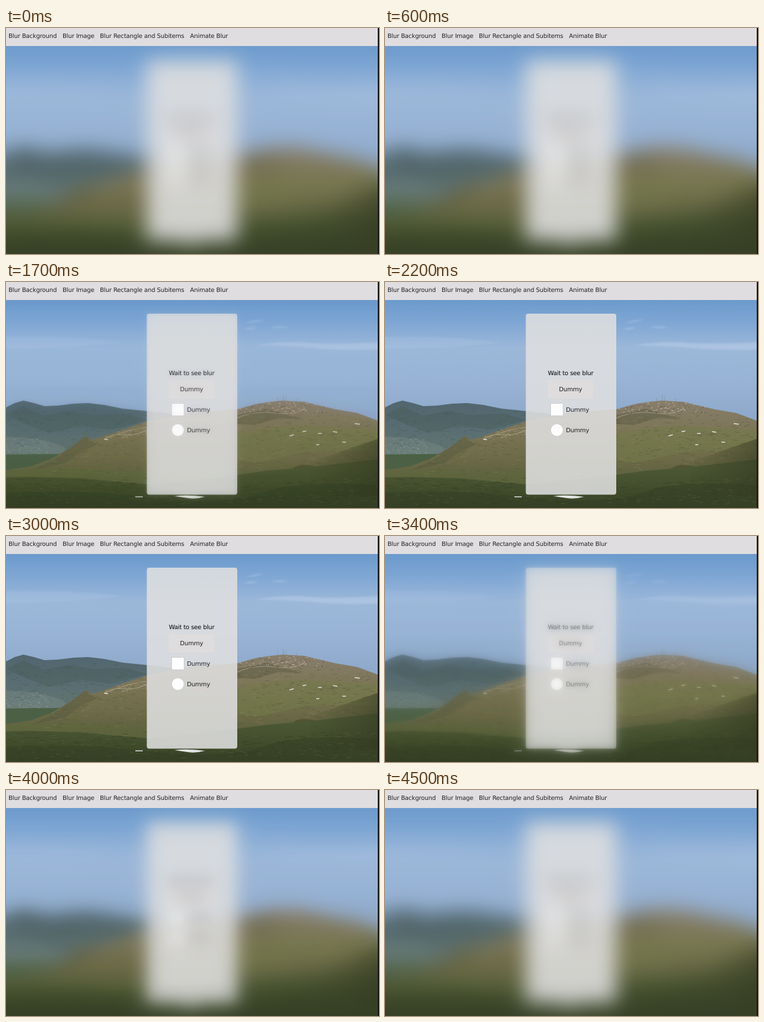
An HTML page that plays this animation: 600 by 364 pixels, repeating every 4600 ms.

```html
<!DOCTYPE html>
<html lang="en">
<head>
<meta charset="utf-8">
<title>Blur demo</title>
<style>
  html, body { margin: 0; width: 100%; height: 100%; overflow: hidden; }
  #stage { position: relative; width: 600px; height: 364px; overflow: hidden; background: #6d9bcc; }
  text, #bar {
    font: 9.7px "DejaVu Sans", sans-serif;
    letter-spacing: -.18px;
    text-rendering: geometricPrecision;
  }
  .defs { position: absolute; width: 0; height: 0; }
  .clouds { filter: blur(1.5px); }
  /* layers overhang the stage so that blurred edges never fade */
  .layer { position: absolute; left: -60px; top: -60px; width: 720px; height: 484px; }
  .soft { filter: blur(2.5px); animation: soft 4.6s linear infinite; will-change: opacity; }
  .mid  { filter: blur(7px);   animation: mid 4.6s linear infinite;  will-change: opacity; }
  .deep { filter: blur(16px);  animation: deep 4.6s linear infinite; will-change: opacity; }
  @keyframes soft {
    0%, 28.2% { opacity: 1; }
    28.26% { opacity: .5; }
    30.43% { opacity: .35; }
    34.8% { opacity: .2; }
    43.5%, 65.2% { opacity: 0; }
    71.7% { opacity: .35; }
    78.26% { opacity: .57; }
    87%, 100% { opacity: 1; }
  }
  @keyframes mid {
    0%, 28.2% { opacity: 1; }
    28.26% { opacity: .55; }
    30.43% { opacity: .38; }
    34.8% { opacity: .15; }
    41.3%, 65.2% { opacity: 0; }
    71.7% { opacity: .25; }
    78.26% { opacity: .54; }
    87%, 100% { opacity: 1; }
  }
  @keyframes deep {
    0%, 21.7% { opacity: 1; }
    21.74%, 28.2% { opacity: .95; }
    28.26% { opacity: .38; }
    30.43% { opacity: .2; }
    34.8% { opacity: .06; }
    39%, 65.2% { opacity: 0; }
    71.7% { opacity: .12; }
    78.26% { opacity: .35; }
    87% { opacity: .88; }
    93.5%, 100% { opacity: 1; }
  }
  #bar { position: absolute; left: 0; top: 0; width: 600px; height: 29px; background: #e0dde0; color: #222; }
  #bar span { position: absolute; top: 0; line-height: 28px; white-space: pre; }
  #edge { position: absolute; left: 598px; top: 0; width: 2px; height: 364px; background: #141414; }
</style>
</head>
<body>
<svg class="defs">
  <defs>
    <linearGradient id="sky" gradientUnits="userSpaceOnUse" x1="0" y1="29" x2="0" y2="215">
      <stop offset="0" stop-color="#6b9acc"/>
      <stop offset=".2" stop-color="#80a7d4"/>
      <stop offset=".42" stop-color="#9cb8d9"/>
      <stop offset=".7" stop-color="#98b3d5"/>
      <stop offset="1" stop-color="#8ea9ca"/>
    </linearGradient>
    <linearGradient id="far" gradientUnits="userSpaceOnUse" x1="0" y1="190" x2="0" y2="285">
      <stop offset="0" stop-color="#51656f"/>
      <stop offset=".45" stop-color="#586d73"/>
      <stop offset="1" stop-color="#657770"/>
    </linearGradient>
    <linearGradient id="hill" gradientUnits="userSpaceOnUse" x1="0" y1="195" x2="0" y2="330">
      <stop offset="0" stop-color="#877d6b"/>
      <stop offset=".3" stop-color="#7d7658"/>
      <stop offset=".65" stop-color="#6d6b48"/>
      <stop offset="1" stop-color="#565c3a"/>
    </linearGradient>
    <linearGradient id="meadow" gradientUnits="userSpaceOnUse" x1="0" y1="300" x2="0" y2="364">
      <stop offset="0" stop-color="#4c5835"/>
      <stop offset=".5" stop-color="#414d2c"/>
      <stop offset="1" stop-color="#384127"/>
    </linearGradient>
    <linearGradient id="shade" gradientUnits="userSpaceOnUse" x1="490" y1="262" x2="610" y2="300">
      <stop offset="0" stop-color="#3a4024" stop-opacity="0"/>
      <stop offset="1" stop-color="#353a22" stop-opacity=".7"/>
    </linearGradient>
    <path id="ridge" d="M-60 312L40 297 75 284 105 266 128 248 138 254 150 251 190 237 228 224
      300 210 372 205 400 197 425 193 445 191 480 193 500 198 530 205 565 211 600 224 660 238V430H-60Z"/>
    <path id="range" d="M-60 214L0 202 14 195 28 191 45 195 62 200 84 199 108 196 132 195 158 198 188 204 228 208 300 216V310H-60Z"/>
    <path id="grass" d="M-60 316L40 314 120 316 228 326 330 316 420 304 500 297 560 290 660 278V430H-60Z"/>
    <clipPath id="inHill"><use href="#ridge"/></clipPath>
    <clipPath id="inRange"><use href="#range"/></clipPath>

    <g id="scene">
      <rect x="-60" y="-60" width="720" height="490" fill="url(#sky)"/>
      <g class="clouds" fill="#bdd0ea">
        <path opacity=".5" d="M400 103Q440 94 490 98T660 93V106Q560 112 500 107T400 103Z"/>
        <path opacity=".2" d="M-60 92Q60 82 190 97Q90 110 -60 106Z"/>
        <path opacity=".35" d="M382 76Q392 71 404 73Q396 79 382 76ZM425 73Q440 69 456 73Q440 76 425 73ZM385 66Q400 60 416 61Q402 66 385 66Z"/>
      </g>
      <use href="#range" fill="url(#far)"/>
      <g clip-path="url(#inRange)">
        <path fill="#475b55" opacity=".4" d="M0 214L28 200 60 215 100 208 140 214 190 212 228 222 170 238 120 232 70 243 30 228Z"/>
        <path fill="#7c8c87" opacity=".35" d="M-60 254Q20 243 72 258T60 280H-60Z"/>
        <g class="town"></g>
      </g>
      <path fill="#4c6046" d="M-60 279Q20 277 92 277L60 312H-60Z"/>
      <use href="#ridge" fill="url(#hill)"/>
      <g clip-path="url(#inHill)">
        <path fill="#55583f" opacity=".45" d="M75 287L128 248 146 262 120 274 95 292 40 304ZM372 214L420 204 480 222 440 219 400 230 372 229Z"/>
        <path fill="#747b49" opacity=".55" d="M372 246Q430 228 500 233T640 240L600 274Q500 266 440 283T372 280Z"/>
        <path fill="#5f683c" opacity=".5" d="M-60 310Q60 296 150 303T240 300V334H-60Z"/>
        <path fill="none" stroke="#bcae97" stroke-width="1.2" opacity=".65" d="M158 254Q172 244 190 246T228 238M165 250L198 239 226 234M372 219Q400 207 432 211T480 204"/>
        <path fill="#4b4a30" opacity=".7" d="M462 299Q478 291 500 298Q498 309 480 310Q468 308 462 299Z"/>
        <g class="land"></g>
      </g>
      <use href="#grass" fill="url(#meadow)"/>
      <path fill="#343e24" opacity=".5" d="M-60 343Q100 331 228 346T420 337T660 334V430H-60Z"/>
      <path fill="url(#shade)" d="M490 290L600 252 660 244V345H490Z"/>
      <g class="turf"></g>
      <path fill="#e3e5e3" d="M271 345Q290 342 320 346Q305 350 292 348Z"/>
      <path fill="none" stroke="#dcdfdc" stroke-width="1.4" d="M208 346h12M456 248l7-2M477 241l6-1M502 244l6 0M526 241l7 1M561 228l8 1M499 262l5 0M158 253l6 1M541 258l6 0"/>
      <path fill="none" stroke="#737d7e" stroke-width=".7" opacity=".6" d="M437 192v-6M446 191v-9M450 191v-6M467 192v-4"/>

      <rect x="226.5" y="51" width="145.5" height="291.5" rx="4" fill="#e0e0e0" fill-opacity=".88"/>
      <rect x="262" y="158" width="73" height="30" fill="#dedcdc"/>
      <g fill="#fdfdfd" stroke="#c8c8c8" stroke-width=".8">
        <rect x="266.5" y="195.5" width="20" height="20"/>
        <circle cx="276.5" cy="238.5" r="10"/>
      </g>
      <text x="298.6" y="150" text-anchor="middle" fill="#050505">Wait to see blur</text>
      <g fill="#202224">
        <text x="298.3" y="176" text-anchor="middle">Dummy</text>
        <text x="291" y="208.7">Dummy</text>
        <text x="291" y="241.7">Dummy</text>
      </g>
    </g>
  </defs>
</svg>

<div id="stage">
  <svg class="layer" viewBox="-60 -60 720 484"><use href="#scene"/></svg>
  <svg class="layer soft" viewBox="-60 -60 720 484"><use href="#scene"/></svg>
  <svg class="layer mid" viewBox="-60 -60 720 484"><use href="#scene"/></svg>
  <svg class="layer deep" viewBox="-60 -60 720 484"><use href="#scene"/></svg>
  <div id="bar">
    <span style="left:4px">Blur Background</span>
    <span style="left:91px">Blur Image</span>
    <span style="left:151px">Blur Rectangle and Subitems</span>
    <span style="left:296px">Animate Blur</span>
  </div>
  <div id="edge"></div>
</div>

<script>
  let seed = 17;
  const rnd = () => (seed = seed * 16807 % 2147483647) / 2147483647;

  // Scatters short slanted strokes over a box as one path.
  function scatter(group, color, count, [x, y, w, h], len, width, alpha) {
    let d = '';
    for (let i = 0; i < count; i++) {
      const px = x + rnd() * w, py = y + rnd() * h, l = len * (.4 + rnd());
      d += `M${px.toFixed(1)} ${py.toFixed(1)}l${l.toFixed(1)} ${((rnd() - .6) * l * .4).toFixed(1)}`;
    }
    const path = document.createElementNS('http://www.w3.org/2000/svg', 'path');
    path.setAttribute('d', d);
    path.setAttribute('stroke', color);
    path.setAttribute('stroke-width', width);
    path.setAttribute('opacity', alpha);
    document.querySelector(group).append(path);
  }

  scatter('.town', '#43584f', 130, [0, 205, 228, 60], 6, 1.3, .3);
  scatter('.town', '#aab3ad', 80, [0, 251, 68, 26], 1.6, 1, .5);
  scatter('.land', '#4a4c34', 420, [40, 212, 560, 105], 6, 1.3, .28);
  scatter('.land', '#9a9270', 260, [60, 215, 540, 95], 5, 1.1, .3);
  scatter('.land', '#c5b8a8', 70, [375, 194, 140, 16], 2, 1.4, .7);
  scatter('.land', '#5b5145', 60, [375, 195, 140, 17], 2, 1.2, .7);
  scatter('.land', '#c1b7a3', 40, [150, 232, 78, 20], 3, 1, .5);
  scatter('.turf', '#2f3a20', 220, [0, 316, 600, 48], 9, 1.5, .32);
  scatter('.turf', '#6b7548', 150, [0, 316, 600, 42], 6, 1.1, .28);
</script>
</body>
</html>
```
